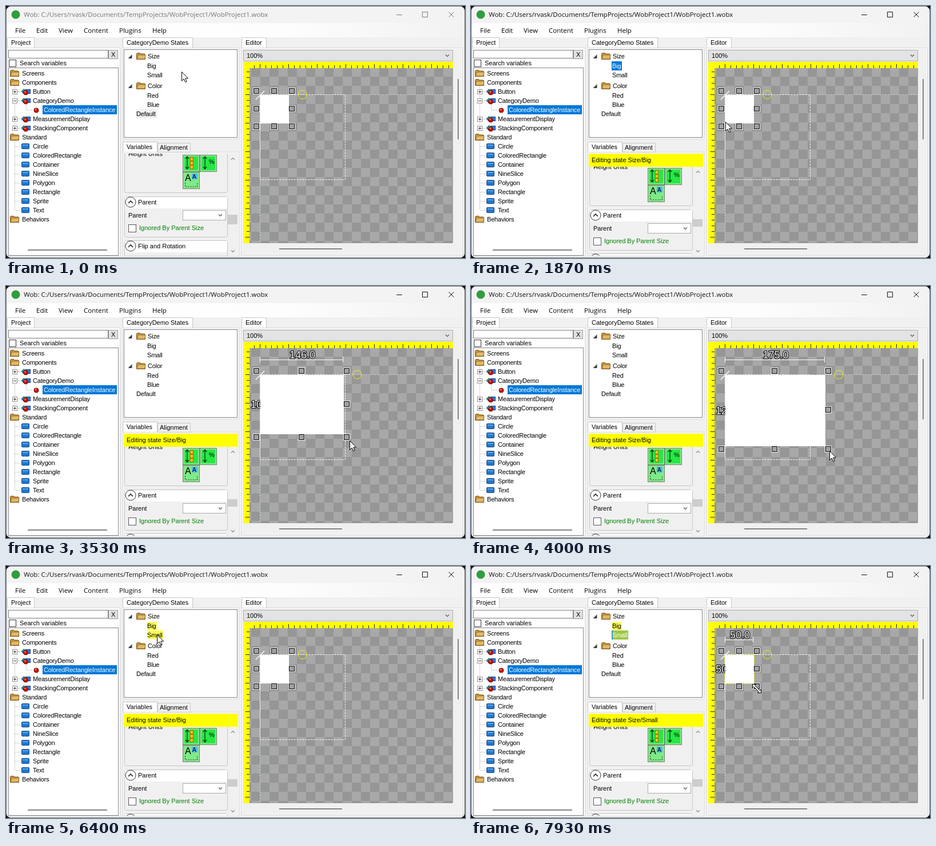
An HTML page for the animation above (8 s loop, 803 by 442 pixels).

```html
<!DOCTYPE html>
<html lang="en">
<head>
<meta charset="utf-8">
<title>State editor</title>
<style>
html, body { margin: 0; width: 100%; height: 100%; overflow: hidden; background: #000; }
svg { display: block; width: 803px; height: 442px; font: 11px "Liberation Sans", Arial, sans-serif; }
text { white-space: pre; }
.ui { font: 11.5px "Open Sans", "Noto Sans", sans-serif; }
.tree { letter-spacing: -.19px; }
.dim { font-size: 18px; fill: #fff; stroke: #000; stroke-width: 2.2px; paint-order: stroke; stroke-linejoin: round; }
</style>
</head>
<body>
<svg id="stage" viewBox="0 0 803 442"></svg>
<script>
const stage = document.getElementById('stage');

const fillBox = (x, y, w, h, fill, extra = '') =>
  `<rect x="${x}" y="${y}" width="${w}" height="${h}" fill="${fill}" ${extra}/>`;
const box = (x, y, w, h, fill, stroke, extra = '') =>
  fillBox(x + .5, y + .5, w - 1, h - 1, fill, `stroke="${stroke}" ${extra}`);
const path = (d, stroke, fill = 'none', extra = '') =>
  `<path d="${d}" stroke="${stroke}" fill="${fill}" ${extra}/>`;
const text = (x, y, s, extra = '') => `<text x="${x}" y="${y}" ${extra}>${s}</text>`;
const group = (id, inner, extra = '') => `<g id="${id}" ${extra}>${inner}</g>`;
const TREE = 'class="tree"';

const folder = (x, y) =>
  path(`M${x + .5} ${y + 5.5}V${y - 4.5}l1-1h5l1 1.5h7l1 1V${y + 5.5}Z`, '#7a5418', '#c8963c') +
  path(`M${x + 1} ${y + 5}l2-7h13l-1 7Z`, '#8a6424', '#e2b868', 'stroke-width=".8"');
const redDot = (x, y) =>
  `<circle cx="${x}" cy="${y}" r="4" fill="#d01010" stroke="#700"/><circle cx="${x - 1}" cy="${y - 1.5}" r="1.2" fill="#ff9a9a"/>`;
const component = (x, y) =>
  path(`M${x} ${y}l4.5-4.5 4.5 4.5-4.5 4.5Z`, '#0d4f4f', '#2a9a90') +
  box(x + 7, y - 4, 9, 8, '#2f7fd8', '#123f80') + redDot(x + 7.5, y + 2);
const blueTile = (x, y) =>
  box(x, y - 5, 14, 10, '#2278cc', '#134486', 'rx="1"') + fillBox(x + 2, y - 3, 10, 2, '#58a2e6');
const expander = (y, open) =>
  box(11, y - 4, 9, 9, '#fff', '#919191') +
  path(`M13 ${y + .5}h5` + (open ? '' : `M15.5 ${y - 2}v5`), '#333');
const chevron = (x, y, dir, color = '#555') =>
  path(`M${x - 3} ${y - 1.5 * dir}l3 ${3 * dir} 3 ${-3 * dir}`, color, 'none', 'stroke-width="1.2"');
const tab = (x, y, w, label) =>
  path(`M${x + .5} ${y + 18}V${y + .5}h${w}V${y + 18}`, '#c6c6c6', '#fff') + text(x + 7, y + 13, label);
const page = (x, y, w, h, fill = '#f0f0f0') =>
  box(x, y, w, h, '#fff', '#d9d9d9') + fillBox(x + 2, y + 2, w - 4, h - 4, fill);

function windowFrame() {
  const menu = [[16, 'File'], [53, 'Edit'], [92, 'View'], [136, 'Content'], [198, 'Plugins'], [256, 'Help']];
  return `<defs><linearGradient id="menuFill"><stop offset="0" stop-color="#fff"/>
      <stop offset=".6" stop-color="#fdfdfd"/><stop offset="1" stop-color="#f2f2f2"/></linearGradient>
      <clipPath id="props"><rect id="propsClip" x="206" y="259" width="200" height="179"/></clipPath>
      <clipPath id="view"><rect x="426" y="109" width="356" height="307"/></clipPath>
      <clipPath id="margin"><rect x="426" y="109" width="19" height="307"/></clipPath>
      <pattern id="checker" x="445" y="156" width="32" height="32" patternUnits="userSpaceOnUse">
      ${fillBox(0, 0, 32, 32, '#a8a8a8') + fillBox(0, 0, 16, 16, '#969696') + fillBox(16, 16, 16, 16, '#969696')}</pattern></defs>` +
    box(0, 0, 803, 442, '#f0f0f0', '#777', 'rx="8"') +
    path('M1 30V9a8 8 0 0 1 8-8h785a8 8 0 0 1 8 8v21Z', 'none', '#f3f3f3') +
    fillBox(1, 30, 801, 25, 'url(#menuFill)') +
    '<circle cx="17" cy="15" r="7.5" fill="#2f9e3f"/>' +
    group('caption',
      text(31, 19, 'Wob: C:/Users/rvask/Documents/TempProjects/WobProject1/WobProject1.wobx', 'class="ui" fill="currentColor"') +
      path('M683 15.5h10M728.5 10.5h9v9h-9ZM774.5 10.5l9 9m0-9l-9 9', 'currentColor')) +
    menu.map(([x, s]) => text(x, 47, s, 'class="ui"')).join('');
}

function projectPanel() {
  let s = page(2, 73, 198, 366, '#fff') + tab(2, 55, 47, 'Project') +
    box(4, 77, 175, 15, '#fff', '#7a7a7a') + box(179, 77, 17, 16, '#e1e1e1', '#999') + text(184, 89, 'X') +
    box(5, 94, 13, 13, '#fff', '#333') + text(24, 104, 'Search variables') +
    box(4, 108, 193, 330, '#fff', '#828790') +
    path('M15.5 140V214M15.5 236V358M35.5 171V182M16 150.5h10M16 166.5h10M36 182.5h10M16 198.5h10M16 214.5h10', '#aaa', 'none', 'stroke-dasharray="1 1"');
  const heading = (y, label) => folder(7, y) + text(28, y + 4, label, TREE);
  s += heading(118, 'Screens') + heading(134, 'Components') + heading(230, 'Standard') + heading(374, 'Behaviors');
  [[150, 'Button'], [166, 'CategoryDemo'], [198, 'MeasurementDisplay'], [214, 'StackingComponent']].forEach(([y, label]) =>
    s += expander(y, y === 166) + component(27, y) + text(47, y + 4, label, TREE));
  s += redDot(53, 183) + fillBox(64, 174, 130, 16, '#0078d7') +
    text(66, 186, 'ColoredRectangleInstance', TREE + ' fill="#fff"');
  ['Circle', 'ColoredRectangle', 'Container', 'NineSlice', 'Polygon', 'Rectangle', 'Sprite', 'Text'].forEach((label, i) => {
    const y = 246 + 16 * i;
    s += path(`M16 ${y + .5}h10`, '#aaa', 'none', 'stroke-dasharray="1 1"') + blueTile(27, y) + text(47, y + 4, label, TREE);
  });
  return s + fillBox(38, 427, 139, 2, '#858585');
}

function statesPanel() {
  const category = (y, label) => path(`M220.5 ${y - 3}v7h-7Z`, 'none', '#404040') + folder(228, y) + text(248, y + 4, label, TREE);
  return page(204, 73, 204, 161) + tab(204, 55, 122, 'CategoryDemo States') +
    box(206, 76, 199, 155, '#fff', '#828790') + category(88, 'Size') + category(140, 'Color') +
    group('defaultSel', fillBox(227, 181, 38, 16, '#f0f0f0')) +
    group('bigSel', fillBox(246, 97, 18, 16, '#0078d7')) +
    group('marks', fillBox(247, 98, 17, 14, '#ffff55') + fillBox(247, 113, 28, 15, '#ffff55')) +
    group('smallSel', fillBox(246, 113, 29, 16, '#3a94c8') + fillBox(248, 113, 27, 16, '#9cc844')) +
    text(247, 109, 'Big', TREE + ' id="big"') + text(247, 125, 'Small', TREE + ' id="small"') +
    text(247, 161, 'Red', TREE) + text(247, 177, 'Blue', TREE) + text(228, 193, 'Default', TREE);
}

function variablesPanel() {
  const button = (x, y, fill) => box(x, y, 30, 30, '#8ee08e', '#6c8a6c') + fillBox(x + 3, y + 3, 24, 24, fill);
  const arrows = x => path(`M${x} 265v20m-3-17l3-4 3 4m-6 14l3 4 3-4`, '#063b10', 'none', 'stroke-width="1.3"');
  const card = (y, h) => box(207, y, 181, h, '#f0f0f0', '#c4c4c4', 'rx="3"');
  const header = (y, label) =>
    fillBox(208, y - 9, 179, 20, '#fff') +
    `<circle cx="218" cy="${y}" r="9" fill="#fff" stroke="#333"/>` +
    path(`M214 ${y + 2}l4-4 4 4`, '#222', 'none', 'stroke-width="1.6"') + text(231, y + 4, label);
  const content = card(200, 128) + text(214, 263, 'Height Units') +
    button(309, 261, '#25e845') + button(339, 261, '#25e845') + button(309, 291, '#80ea88') + arrows(317) + arrows(348) +
    [265, 272, 279].map(y => box(322, y, 6, 7, '#ffc21a', '#b06a00')).join('') + text(355, 277, '%') +
    text(313, 307, 'A', 'font-size="16"') + fillBox(325, 294, 10, 10, '#4cb8e8') + text(326, 303, 'A', 'font-size="10"') +
    path('M313.5 310v7h21v-7', '#063b10', 'none', 'stroke-dasharray="2 2"') +
    card(334, 72) + header(344, 'Parent') + text(214, 371, 'Parent') +
    box(309, 358, 76, 18, '#fff', '#acacac') + chevron(375, 367, 1) +
    box(214, 383, 14, 14, '#fff', '#555') + text(233, 393, 'Ignored By Parent Size', 'fill="#008000"') +
    card(411, 60) + header(421, 'Flip and Rotation');
  return page(204, 256, 204, 183) + tab(204, 238, 60, 'Variables') +
    box(265, 240, 58, 17, '#f0f0f0', '#c6c6c6') + text(269, 252, 'Alignment') +
    `<g clip-path="url(#props)">${group('propsBody', content)}</g>` +
    group('bar', fillBox(206, 259, 200, 23, '#ff0') + text(211, 274, '', 'id="barText"')) +
    group('scrollUp', chevron(397, 268, -1, '#888')) + chevron(397, 430, 1, '#888') +
    '<rect id="thumb" x="388" width="17" fill="#cdcdcd"/>';
}

function editorPanel() {
  let ticks = '';
  for (let x = 435; x < 782; x += 10) ticks += `M${x - .5} ${(x - 445) % 50 ? 104 : 102}V109`;
  for (let y = 116; y < 416; y += 10) ticks += `M${(y - 156) % 50 ? 421 : 419} ${y - .5}H426`;
  const handles = Array.from({ length: 8 }, () =>
    `<g class="handle">${fillBox(-6, -6, 12, 12, '#fff') + fillBox(-5, -5, 10, 10, '#000') + fillBox(-4, -4, 8, 8, '#a0a0a0')}</g>`).join('');
  return page(412, 73, 387, 364) + tab(412, 55, 43, 'Editor') +
    box(415, 77, 367, 20, '#e3e3e3', '#adadad') + text(421, 91, '100%') + chevron(772, 87, 1) +
    fillBox(415, 98, 367, 318, '#ff0') + path(ticks, '#222') + fillBox(426, 109, 356, 307, 'url(#checker)') +
    `<g clip-path="url(#view)">` +
    path('M594 155.5H782', '#e4eef0', 'none', 'stroke-dasharray="3 2" opacity=".6"') +
    path('M444.5 156V416', '#b4e2ec', 'none', 'stroke-dasharray="3 2"') +
    '<rect id="shape" x="445" y="156" fill="#fff"/>' +
    path('M444.5 155.5h149v149h-149Z', '#fff', 'none', 'stroke-dasharray="3 2"') +
    '<rect id="hover" x="443.5" y="154.5" fill="none" stroke="#f4f000" stroke-dasharray="2 2"/>' +
    group('topDim', '<path id="dimLine" stroke="#fff" fill="none"/>' +
      text(0, 127, '', 'class="dim" id="widthText" text-anchor="middle"')) +
    handles + group('sideDim', text(428, 0, '', 'class="dim" id="heightText"'), 'clip-path="url(#margin)"') +
    path('M437 164L452 149', '#fff', 'none', 'stroke-width="1.4"') +
    '<circle id="spin" cy="155.5" r="7.5" fill="none" stroke="#f6f000"/></g>' +
    fillBox(478, 425, 110, 2, '#858585') + fillBox(790, 128, 2, 106, '#858585');
}

const cursors = group('arrow', path('M.5.5V16.3l3.6-3.4 2.6 5.6 2.4-1.1-2.5-5.4h4.9Z', '#000', '#fff')) +
  group('resize', path('M-7.5-7.5h6l-2 2 9 9 2-2v6h-6l2-2-9-9-2 2Z', '#000', '#fff'));

stage.innerHTML = windowFrame() + projectPanel() + statesPanel() + variablesPanel() + editorPanel() + cursors;

const el = id => document.getElementById(id);
const show = (id, on) => el(id).setAttribute('display', on ? 'inline' : 'none');
const set = (id, attrs) => Object.entries(attrs).forEach(([k, v]) => el(id).setAttribute(k, v));
const handleEls = [...document.querySelectorAll('.handle')];

// Keys are [tick, a, b]; there are 15 ticks per second.
const pointer = [[0, 307, 115], [4, 273, 105], [10, 254, 104], [23, 254, 104], [28, 445, 203], [31, 480, 215],
  [36, 499, 212], [38, 499, 213], [41, 499, 213], [42, 500, 213], [44, 500, 213], [53, 601, 271], [57, 618, 281],
  [61, 630, 291], [71, 630, 291], [75, 388, 153], [79, 300, 131], [84, 271, 125], [88, 264, 120], [103, 264, 120],
  [107, 410, 175], [110, 488, 214], [113, 505, 221], [115, 500, 215]];
const size = [[44, 50, 50], [53, 146, 104], [57, 160, 114], [61, 180, 128], [95, 180, 128], [96, 50, 50]];

function sample(keys, n) {
  const i = keys.findIndex(k => k[0] > n);
  if (i === 0) return keys[0].slice(1);
  if (i < 0) return keys[keys.length - 1].slice(1);
  const [a, b] = [keys[i - 1], keys[i]], p = (n - a[0]) / (b[0] - a[0]);
  return [1, 2].map(k => Math.round(a[k] + (b[k] - a[k]) * p));
}

function draw(ms) {
  const n = Math.floor((ms + 5) * .015);
  const within = (from, to = Infinity) => n >= from && n < to;
  const editing = n >= 16, shift = editing ? 23 : 0;
  const bigPicked = within(16, 42), smallPicked = n >= 97;

  el('caption').style.color = n >= 13 ? '#111' : '#777';
  show('defaultSel', !editing);
  show('bigSel', bigPicked);
  show('marks', n >= 69);
  show('smallSel', smallPicked);
  set('big', { fill: bigPicked ? '#fff' : '#000' });
  set('small', { fill: smallPicked ? '#fff' : '#000' });

  show('bar', editing);
  el('barText').textContent = 'Editing state Size/' + (smallPicked ? 'Small' : 'Big');
  set('propsClip', { y: 259 + shift, height: 179 - shift });
  set('propsBody', { transform: `translate(0 ${shift})` });
  set('scrollUp', { transform: `translate(0 ${shift})` });
  set('thumb', editing ? { y: 374, height: 13 } : { y: 366, height: 17 });

  const [w, h] = sample(size, n), right = 445 + w, bottom = 156 + h;
  set('shape', { width: w, height: h });
  set('spin', { cx: right + 23.5 });
  const xs = [438, Math.floor((443 + right) / 2), right + 5], ys = [149, Math.floor((154 + bottom) / 2), bottom + 5];
  const spots = ys.flatMap(y => xs.map(x => [x, y]));
  spots.splice(4, 1);
  handleEls.forEach((g, i) => g.setAttribute('transform', `translate(${spots[i]})`));

  const measuring = within(42, 69) || n >= 115;
  show('topDim', measuring);
  show('sideDim', measuring);
  set('dimLine', { d: `M444.5 124v10M${right - 1.5} 124v10M444 129.5H${right - 1}` });
  set('widthText', { x: 445.5 + w / 2 });
  set('heightText', { y: 162 + h / 2 });
  el('widthText').textContent = w.toFixed(1);
  el('heightText').textContent = h.toFixed(1);

  const overContainer = within(29, 34) || within(109, 115), overShape = n >= 115;
  show('hover', overContainer || overShape);
  set('hover', overShape ? { width: w + 2, height: h + 2 } : { width: 152, height: 152 });

  const resizing = within(34, 42) || within(69, 72) || n >= 113;
  const [x, y] = sample(pointer, n);
  show('arrow', !resizing);
  show('resize', resizing);
  set(resizing ? 'resize' : 'arrow', { transform: `translate(${x} ${y})` });
}

const start = performance.now();
function tick() {
  draw((performance.now() - start) % 8000);
  requestAnimationFrame(tick);
}
tick();
</script>
</body>
</html>
```
